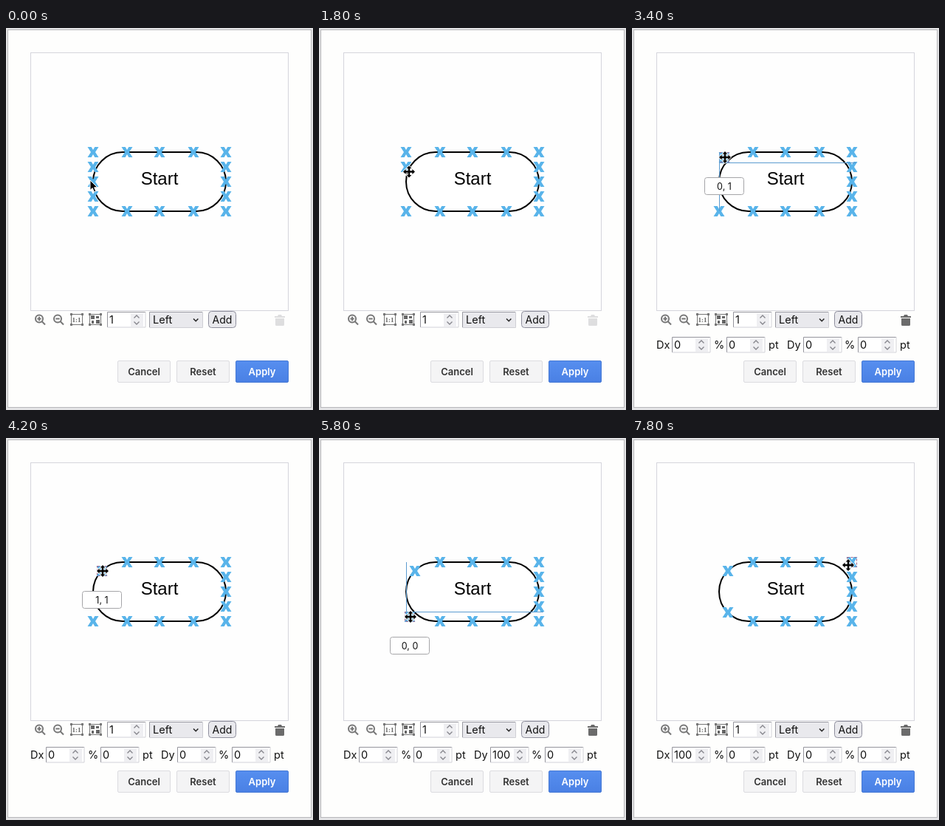
Write an HTML page that moves like this. It is 416 px wide and 517 px high and loops after 8 s.

```html
<!DOCTYPE html>
<html lang="en">
<head>
<meta charset="utf-8">
<title>Connection points</title>
<style>
  html, body { margin: 0; width: 100%; height: 100%; overflow: hidden; background: #e4e4e6; }
  svg { display: block; width: 100%; height: 100%; }
  text { font-family: Inter, Roboto, sans-serif; font-size: 14.5px; fill: #111; }
  .label { font-family: "Liberation Sans", Arial, sans-serif; font-size: 24px; text-anchor: middle; fill: #000; }
  .button { font-size: 13px; font-weight: 600; text-anchor: middle; fill: #333; }
  .hint { font-size: 12.5px; text-anchor: middle; }
  .icon { fill: none; stroke: #777; stroke-width: 2; }
</style>
</head>
<body>
<svg viewBox="0 0 416 517">
  <defs>
    <path id="cross" fill="#59b4ea" d="M-7.5-7h5.2L0-3 2.3-7h5.2L3 0l4.5 7H2.3L0 3-2.3 7h-5.2L-3 0z"/>
    <path id="move" fill="#000" stroke="#fff" stroke-width="1.6" paint-order="stroke" stroke-linejoin="round"
      d="M0-8L3.4-4.4H1.2V-1.2H4.4V-3.4L8 0 4.4 3.4V1.2H1.2V4.4H3.4L0 8-3.4 4.4H-1.2V1.2H-4.4V3.4L-8 0-4.4-3.4V-1.2H-1.2V-4.4H-3.4z"/>
    <path id="arrow" fill="#000" stroke="#fff" stroke-width="1" d="M0 0V13.5L3.2 10.6 5.4 15.8 7.8 14.8 5.6 9.8H9.8z"/>
    <linearGradient id="blue" x2="0" y2="1"><stop stop-color="#568eef"/><stop offset="1" stop-color="#4a80e4"/></linearGradient>
  </defs>
  <rect x="2.5" y="2.5" width="411" height="511" fill="#fefefd" stroke="#b8b8bb"/>
  <rect x="33.5" y="33.5" width="349" height="349" fill="#fefefe" stroke="#d5d5dc"/>
  <rect x="118" y="168" width="180" height="80" rx="40" fill="#fff" stroke="#000" stroke-width="2"/>
  <text class="label" x="208" y="212">Start</text>

  <g class="icon">
    <circle cx="45" cy="393.5" r="5"/><path d="M48.5 397l4.5 4.5M42.3 393.5h5.4M45 390.8v5.4"/>
    <circle cx="70" cy="393.5" r="5"/><path d="M73.5 397l4.5 4.5M67.3 393.5h5.4"/>
    <g id="frames" stroke-width="1"></g>
  </g>
  <text x="95.5" y="398" text-anchor="middle" style="font:bold 9px 'Liberation Serif',serif;fill:#666">1:1</text>
  <path fill="#666" d="M115 389h5v5h-5zM122 390h4v3h-4zM116 396h3v4h-3zM122 395h5v5h-5z"/>
  <path id="trash" d="M364 390h4l1-2h4l1 2h4v2h-14zM365 393h12v8.500q0 1.500-1.500 1.500h-9q-1.500 0-1.500-1.500z"/>

  <g id="toolbar"></g>
  <rect x="194" y="384" width="72" height="21" rx="1" fill="#e9e9ed"/>
  <path d="M194.500 405V384.500H266" fill="none" stroke="#9a9aa2"/>
  <path d="M194.500 405.500H266.500V384.500" fill="none" stroke="#cfcfd5"/>
  <text x="199" y="400">Left</text>
  <path d="M254 393.500l3.200 3.200 3.200-3.200" fill="none" stroke="#222" stroke-width="1.500"/>
  <rect x="274.500" y="383.500" width="37" height="22" rx="4" fill="#e9e9ed" stroke="#8f8f9d"/>
  <text x="293" y="400" text-anchor="middle" style="font-size:14px">Add</text>

  <g id="offsets"></g>
  <g id="buttons"></g>
  <g id="scene"></g>
</svg>
<script>
const STEP = 200, STEPS = 40;
const byId = id => document.getElementById(id);
const use = (id, x, y) => `<use href="#${id}" x="${x}" y="${y}"/>`;
const label = (x, y, text, cls = '') => `<text class="${cls}" x="${x}" y="${y}">${text}</text>`;

function field(x, y, value) {
  return `<rect x="${x}" y="${y}" width="52" height="21" fill="#fff"/>
    <path d="M${x + .5} ${y + 21}V${y + .5}H${x + 52}" fill="none" stroke="#94949c"/>
    <path d="M${x + .5} ${y + 21}H${x + 52}V${y}" fill="none" stroke="#d2d2d8"/>
    ${label(x + 3, y + 16, value)}
    <rect x="${x + 32}" y="${y + 2}" width="17" height="18" fill="#efeff2"/>
    <path d="M${x + 36.5} ${y + 8.5}l3.500-3.500 3.500 3.500m0 5l-3.500 3.500-3.500-3.500" fill="none" stroke="#85858c" stroke-width="1.300"/>`;
}

function offsetRow(dx, dy) {
  return label(33, 434, 'Dx') + field(54, 418, dx) + label(111, 434, '%') + field(128, 418, 0) + label(185, 434, 'pt')
    + label(210, 434, 'Dy') + field(232, 418, dy) + label(288, 434, '%') + field(306, 418, 0) + label(363, 434, 'pt');
}

byId('toolbar').innerHTML = field(137, 384, 1);
byId('buttons').innerHTML = [[151, 'Cancel'], [231, 'Reset'], [311, 'Apply']].map(([x, text]) => {
  const primary = text === 'Apply';
  return `<rect x="${x + .5}" y="450.500" width="71" height="29" rx="1.500" fill="${primary ? 'url(#blue)' : '#f4f4f5'}" stroke="${primary ? '#4579d5' : '#dcdce0'}"/>
    <text class="button" x="${x + 36}" y="470"${primary ? ' style="fill:#fff"' : ''}>${text}</text>`;
}).join('');
byId('frames').innerHTML = [87, 112].map(x =>
  `<rect x="${x + 1.5}" y="387.500" width="15" height="14"/>` +
  [0, 15].map(i => [386, 400].map(y => `<rect x="${x + i}" y="${y}" width="3" height="3" fill="#777" stroke="none"/>`).join('')).join('')
).join('');

// Pointer positions by step, linear in between
const pointerKeys = [
  [0, 114, 206], [1, 117, 206], [3, 118, 206], [4, 118, 212], [5, 119, 226], [7, 119, 227], [8, 121, 211],
  [9, 122, 194.5], [10, 121, 190], [11, 122, 183], [12, 122, 183], [13, 121, 171], [14, 119, 169], [15, 119, 169],
  [16, 123, 172], [17, 126, 175], [20, 131, 180], [24, 131, 180], [25, 124, 222], [26, 120, 248], [28, 120, 248],
  [29, 124, 242], [31, 130, 236], [33, 130, 236], [34, 146, 226], [35, 240, 190], [36, 299, 169], [37, 298, 168], [39, 293, 172]
];
function pointerAt(step) {
  const i = pointerKeys.findIndex(key => key[0] >= step);
  const [s1, x1, y1] = pointerKeys[i], [s0, x0, y0] = pointerKeys[Math.max(0, i - 1)];
  const k = s1 === s0 ? 1 : (step - s0) / (s1 - s0);
  return [x0 + (x1 - x0) * k, y0 + (y1 - y0) * k];
}

const fixedPoints = [];
for (const x of [164, 208, 254]) fixedPoints.push([x, 168], [x, 248]);
for (const y of [168, 188, 208, 228, 248]) fixedPoints.push([298, y]);

// Points deleted from the left side, and corners dragged onto the outline
const removed = [{ y: 208, from: 2, to: 4 }, { y: 228, from: 6, to: 8 }, { y: 188, from: 10, to: 11 }];
const corners = [
  { y: 168, endY: 180, select: 14, drag: 16, drop: 23, next: 27, dy: [0, 15], sign: '' },
  { y: 248, endY: 236, select: 27, drag: 29, drop: 32, next: 37, dy: [100, 85], sign: '-' }
];

function draw(step) {
  const [px, py] = pointerAt(step);
  const points = [...fixedPoints];
  let selected = null, values = null, overlay = '';

  for (const { y, from, to } of removed) {
    if (step < to) points.push([118, y]);
    if (step >= from && step < to) { selected = [118, y]; values = [0, (y - 168) / .8]; }
  }
  for (const c of corners) {
    const dragging = step >= c.drag && step < c.drop, dropped = step >= c.drop;
    const point = dragging ? [px - 1, py] : dropped ? [130, c.endY] : [118, c.y];
    points.push(point);
    if (step >= c.select && step < c.next) {
      selected = point;
      values = dropped ? ['7.00', c.dy[1]] : [0, c.dy[0]];
    }
    if (!dragging) continue;
    const age = step - c.drag;
    if (age < 2) {
      const lineY = c.sign ? 235 : 182;
      overlay += `<path d="M118 ${lineY}.5H304M118.500 168V248" fill="none" stroke="#5b9bd0"/>`;
    }
    const hint = `${age > 1 ? 1 : 0}, ${age ? c.sign + 1 : 0}`;
    overlay += `<rect x="${px - 27.5}" y="${py + 27.5}" width="53" height="23" rx="3" fill="#fff" stroke="#a5a5a8"/>`
      + label(px - 1, py + 43.5, hint, 'hint');
  }
  if (step >= 37) { selected = [298, 168]; values = [100, 0]; }

  byId('trash').setAttribute('fill', values ? '#6b6b6b' : '#dededf');
  byId('offsets').innerHTML = values ? offsetRow(...values) : '';
  const outline = selected
    ? `<rect x="${selected[0] - 6.5}" y="${selected[1] - 6.5}" width="13" height="13" fill="none" stroke="#a0658c" stroke-dasharray="3 2"/>` : '';
  byId('scene').innerHTML = points.map(([x, y]) => use('cross', x, y)).join('')
    + outline + overlay + use(step ? 'move' : 'arrow', px, py);
}

let shown = -1;
function tick() {
  const step = Math.floor(performance.now() / STEP) % STEPS;
  if (step !== shown) draw(shown = step);
  requestAnimationFrame(tick);
}
tick();
</script>
</body>
</html>
```
